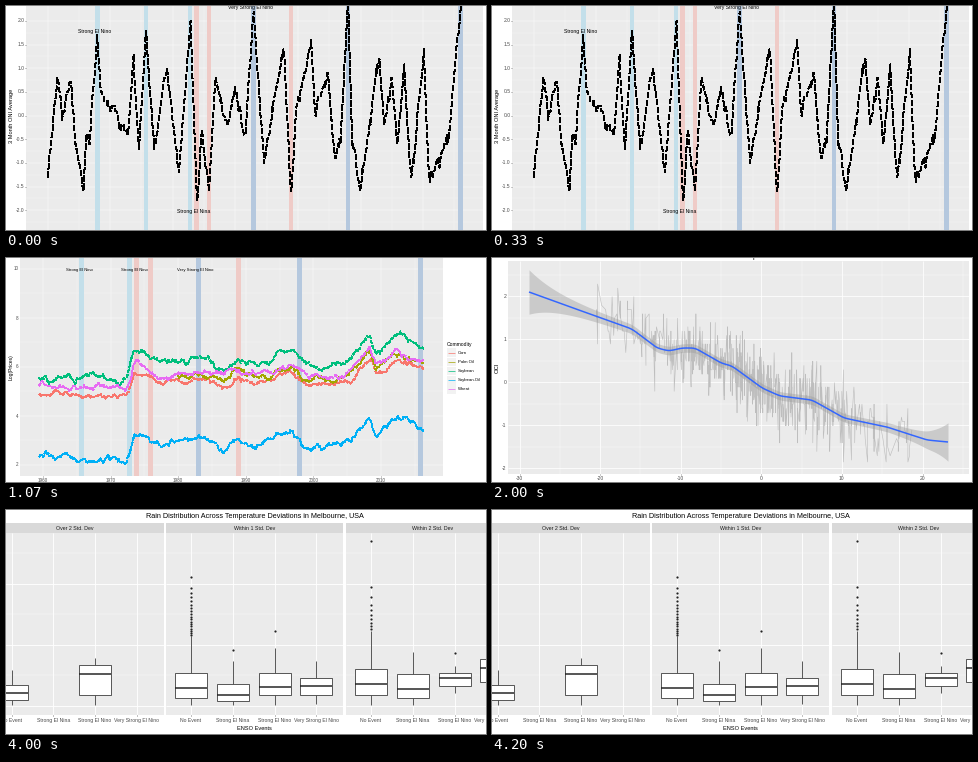
A matplotlib script for the animation above (4990 ms loop, 480x224 px).

```python
import numpy as np
import matplotlib.pyplot as plt
from matplotlib.animation import FuncAnimation
from matplotlib.patches import Rectangle

W, H, DPI = 480, 224, 100
PX = 72 / DPI
PANEL, STRIP, TICK = "#EBEBEB", "#D9D9D9", "#4D4D4D"
SKY, ROSE, STEEL = "#C3DFEA", "#EFCBC7", "#B5C8DE"

plt.rcParams["font.family"] = "Liberation Sans"
fig = plt.figure(figsize=(W / DPI, H / DPI), dpi=DPI, facecolor="white")
ax = fig.add_axes([0, 0, 1, 1])


def rect(x0, y0, x1, y1, color, edge="none", lw=0, z=1):
    ax.add_patch(Rectangle((x0, y0), x1 - x0, y1 - y0, facecolor=color,
                           edgecolor=edge, linewidth=lw * PX, zorder=z))


def line(x, y, color="black", lw=1.0, z=4, **style):
    ax.plot(x, y, color=color, lw=lw * PX, zorder=z,
            solid_capstyle="butt", **style)


def broken_line(x, y, color, on, off):
    """One-pixel line with hard edges and small gaps."""
    line(x, y, color, 0.9, ls=(0, (on, off)), antialiased=False)


def text(x, y, s, size, color="black", ha="center", va="center", rot=0):
    ax.text(x, y, s, fontsize=size * PX, color=color, ha=ha, va=va,
            rotation=rot, zorder=9)


def panel(x0, y0, x1, y1, xs, ys, minor_x=(), minor_y=(), major=0.45, minor=0.2):
    rect(x0, y0, x1, y1, PANEL)
    for values, lw in ((minor_x, minor), (xs, major)):
        for x in values:
            if x0 < x < x1:
                line([x, x], [y0, y1], "white", lw, 2)
    for values, lw in ((minor_y, minor), (ys, major)):
        for y in values:
            if y0 < y < y1:
                line([x0, x1], [y, y], "white", lw, 2)


def bands(centers, color, bottom=H):
    for x in centers:
        rect(x - 2.4, 0, x + 2.4, bottom, color, z=3)


def wander(points, x, rng, sd, keep):
    """Interpolate the points and add autocorrelated noise."""
    noise = np.zeros(len(x))
    for i in range(1, len(x)):
        noise[i] = keep * noise[i - 1] + rng.normal(0, sd)
    return np.interp(x, *np.array(points, float).T) + noise


# Peaks and troughs: stage x, index value
OSCILLATION = [
    (41.5, -1.3), (52, 0.9), (56, 0), (65, 0.8), (69, -0.5), (77.5, -1.6),
    (80, -0.5), (84, -0.4), (91, 1.7), (95, 0.4), (122, -0.4), (127.5, 1.2),
    (133, -0.8), (140, 1.8), (148, -0.7), (161, 1), (173, -1.3), (184.5, 2),
    (191, -1.9), (196, -0.4), (203, -1.6), (209, 0.8), (222, -0.3),
    (229, 0.6), (239, -0.4), (247.5, 2.3), (258, -1), (278, 1.6),
    (285, -1.8), (290, 0), (305, 1.6), (309, 0), (322, 0.9), (329, -0.9),
    (335, -0.4), (342, 2.4), (346, -0.5), (354.5, -1.6), (373, 1.3),
    (378, -0.1), (386, 0.7), (391, -0.6), (398, 1), (405, -1.4), (418, 1.3),
    (423, -1.4), (443, -0.4), (455.5, 2.5)]


def oni_history():
    y_of = lambda v: 109.6 - 47.3 * v
    halves = np.arange(-2, 2.1, 0.5)
    decades = 41.5 + 62.6 * np.arange(8)
    panel(20, -5, 477, 229, decades, y_of(halves), decades + 31.3,
          y_of(halves - 0.25))
    bands((91.5, 140, 184), SKY)
    bands((190.5, 203, 285), ROSE)
    bands((247.8, 342, 454.3), STEEL)
    months = np.arange(41.5, 455.6, 0.522)
    index = wander(OSCILLATION, months, np.random.default_rng(4), 0.05, 0.7)
    broken_line(months, y_of(np.round(index, 1)), "black", 6, 2.5)
    for v in halves:
        text(18.5, y_of(v), f"{v:.1f}", 5, TICK, "right")
        line([19, 20], [y_of(v)] * 2, "#333333", 0.5)
    text(88.5, 25, "Strong El Nino", 5.1)
    text(245, 1, "Very Strong El Nino", 5.1)
    text(188, 205, "Strong El Nina", 5.1)
    text(6, 109.5, "3 Month ONI Average", 5.6, rot=90)


# Shared price movement, in pixels from each series' starting level
MARKET = [
    (33, 0), (120, 2), (128, -24), (140, -20), (155, -12), (195, -18),
    (218, -8), (232, -18), (250, -12), (284, -24), (305, -9), (345, -14),
    (364, -38), (370, -22), (392, -38), (418, -26)]
COMMODITIES = (  # name, color, first x, level, gain
    ("Corn", "#F8766D", 33, 136, 0.9), ("Palm Oil", "#A3A500", 172, 132, 1),
    ("Soybean", "#00BF7D", 33, 119.5, 1.1),
    ("Soybean.Oil", "#00B0F6", 33, 199, 1.05),
    ("Wheat", "#E76BF3", 33, 128, 0.95))


def commodity_prices():
    decades = 37 + 67.6 * np.arange(6)
    ticks = 11 + 49 * np.arange(5)
    panel(14, 0, 437, 218, decades, ticks, 3.2 + 67.6 * np.arange(7),
          ticks[:-1] + 24.5)
    bands((75.8, 123.5), SKY, 218)
    bands((130.3, 144.2, 232.5), ROSE, 218)
    bands((192.5, 293.5, 414.5), STEEL, 218)
    rng = np.random.default_rng(11)
    for i, (name, color, start, level, gain) in enumerate(COMMODITIES):
        x = np.arange(start, 418, 0.563)
        y = level + gain * wander(MARKET, x, rng, 0.9, 0.92)
        broken_line(x, y, color, 3.5, 1.8)
        row = 94.8 + 9.15 * i
        rect(441, row - 4.3, 450, row + 4.3, "#F2F2F2")
        line([442, 449], [row, row], color, 0.7)
        text(452, row, name, 4.2, ha="left")
    text(441, 86.5, "Commodity", 5, ha="left")
    for x, year in zip(decades, range(1960, 2011, 10)):
        text(x, 222, year, 4.5, TICK)
        line([x, x], [218, 219], "#333333", 0.5)
    for y, v in zip(ticks, range(10, 1, -2)):
        text(12.5, y, v, 4.5, TICK, "right")
    text(73.5, 12, "Strong El Nino", 4.25)
    text(128, 12, "Strong El Nino", 4.25)
    text(189.5, 12, "Very Strong El Nino", 4.25)
    text(5.5, 109, "Log(Prices)", 5, rot=90)


TREND = [
    (37, 34), (70, 46), (140, 71), (165, 90), (177, 93), (190, 90), (203, 90),
    (229, 105), (240, 108), (270, 130), (288, 138), (320, 142), (352, 160),
    (395, 169), (435, 182), (456, 184)]


def smooth_trend():
    xt = 27.5 + 80.6 * np.arange(6)
    yt = 38.5 + 43 * np.arange(5)
    panel(16, 3, 477, 216, xt, yt, xt + 40.3, yt - 21.5, 0.8, 0.4)
    trend = np.array(TREND, float).T
    rng = np.random.default_rng(7)
    x = np.r_[rng.normal(272, 72, 760), rng.uniform(100, 136, 10)]
    x = np.sort(np.round(x[(x > 100) & (x < 430)] / 0.806) * 0.806)
    y = np.interp(x, *trend) + rng.normal(0, 17, len(x))
    y = np.clip(np.round(y / 4.3) * 4.3, 26, 204)
    line(x, y, "#BEBEBE", 0.6)

    x = np.linspace(37, 456, 300)
    kernel = np.hanning(11) / np.hanning(11).sum()
    padded = np.pad(np.interp(x, *trend), 5, mode="reflect", reflect_type="odd")
    mid = np.convolve(padded, kernel, "valid")
    half = 4.2 + 18 * np.exp((37 - x) / 28) + 15 * np.exp((x - 456) / 18)
    ax.fill_between(x, mid - half, mid + half, color="#999999", alpha=0.4,
                    lw=0, zorder=5)
    line(x, mid, "#3366FF", 1.5, 6)
    for px, v in zip(xt, range(-30, 21, 10)):
        text(px, 220, v, 5, TICK)
        line([px, px], [216, 217], "#333333", 0.5)
    for py, v in zip(yt, range(2, -3, -1)):
        text(14.5, py, v, 5, TICK, "right")
    text(5.5, 109.5, "OCI", 6, rot=90)
    text(262, 0, "p", 7, va="baseline")


def box(x, top, median, bottom, reach):
    """Box with an upper whisker of reach box heights."""
    height = bottom - top
    line([x, x], [top - reach * height, top], "#333333", 0.8)
    line([x, x], [bottom, min(bottom + height / 2, 195)], "#333333", 0.8)
    rect(x - 16, top, x + 16, bottom, "white", "#333333", 0.8, z=5)
    line([x - 16, x + 16], [median, median], "#222222", 1.5, 6)


def outliers(x, far, near, count=1, bend=1):
    y = far + (near - far) * np.linspace(0, 1, count) ** bend
    ax.plot([x] * count, y, "o", color="#222222", ms=2.2 * PX, mew=0, zorder=6)


def rain_boxes(place, left, shift, firsts, major, boxes, dots):
    """Three facets; firsts holds the x of each facet's first category."""
    edges = ((-20, left), (left + 2.7, left + 179.2), (left + 182, 500))
    names = ("Over 2 Std. Dev", "Within 1 Std. Dev", "Within 2 Std. Dev")
    groups = ("No Event", "Strong El Nina", "Strong El Nino",
              "Very Strong El Nino")
    ys = 196 - major * np.arange(7)
    slot = lambda facet, group: firsts[facet] + 41.8 * group
    for facet, ((x0, x1), name, mid) in enumerate(zip(edges, names, (70, 249.5, 428))):
        xs = [slot(facet, g) for g in range(4)]
        panel(x0, 23, x1, 205, xs, ys, (), ys - major / 2, 0.9, 0.4)
        rect(x0, 13, x1, 23, STRIP)
        text(mid + shift, 18.5, name, 5.3, "#1A1A1A")
        for x, group in zip(xs, groups):
            text(x, 210.5, group, 5.1, TICK)
            line([x, x], [205, 206.3], "#333333", 0.6)
    for facet, group, *shape in boxes:
        box(slot(facet, group), *shape)
    for facet, group, *spread in dots:
        outliers(slot(facet, group), *spread)
    text(249.5 + shift / 2, 6.8, "Rain Distribution Across Temperature "
         f"Deviations in Melbourne, {place}", 7.25)
    text(249.5 + shift, 218, "ENSO Events", 5.7)


def rain_australia():
    rain_boxes(
        "Australia", 159.2, 0, (7, 187, 366), 34.6,
        boxes=((0, 0, 174, 174.7, 190, 0.3), (1, 0, 144, 161, 174.5, 1.5),
               (1, 1, 130.5, 156.5, 163.5, 1.5), (1, 2, 154.5, 167, 178, 0.8),
               (1, 3, 161, 164, 170, 0.6), (2, 0, 150.5, 164, 177.5, 1.25),
               (2, 1, 157, 164, 176, 1.05), (2, 2, 144, 164, 176.5, 0.6),
               (2, 3, 174, 181, 189, 0.6)),
        dots=((1, 0, 53.5, 96, 5, 1.3), (2, 0, 31, 109, 7, 0.3),
              (2, 1, 121, 121), (2, 2, 57.5, 57.5)))


def rain_usa():
    rain_boxes(
        "USA", 157.6, -1.3, (5.5, 185, 365), 61,
        boxes=((0, 0, 175.5, 183, 190, 1.05), (0, 2, 155.5, 164, 185, 0.25),
               (1, 0, 163.5, 178.5, 188.5, 1.5), (1, 1, 174, 185, 191, 1.35),
               (1, 2, 163.5, 177, 185.5, 1.15), (1, 3, 168.5, 176.5, 185.5, 1),
               (2, 0, 159.5, 174.5, 185, 1.5), (2, 1, 164.5, 179, 188.5, 0.95),
               (2, 2, 163.5, 168, 176.5, 0.6), (2, 3, 149, 158, 172, 0.4)),
        dots=((1, 0, 67, 125, 18, 0.6), (1, 1, 140.5, 140.5),
              (1, 2, 121, 121), (2, 0, 31, 119.5, 10, 0.3),
              (2, 2, 143, 143)))


SCENES = (oni_history, commodity_prices, smooth_trend, rain_australia, rain_usa)


def update(i):
    ax.clear()
    ax.set_axis_off()
    SCENES[i]()
    ax.set_xlim(0, W)
    ax.set_ylim(H, 0)


anim = FuncAnimation(fig, update, frames=len(SCENES), interval=998,
                     repeat=True, repeat_delay=0)
plt.show()
```
